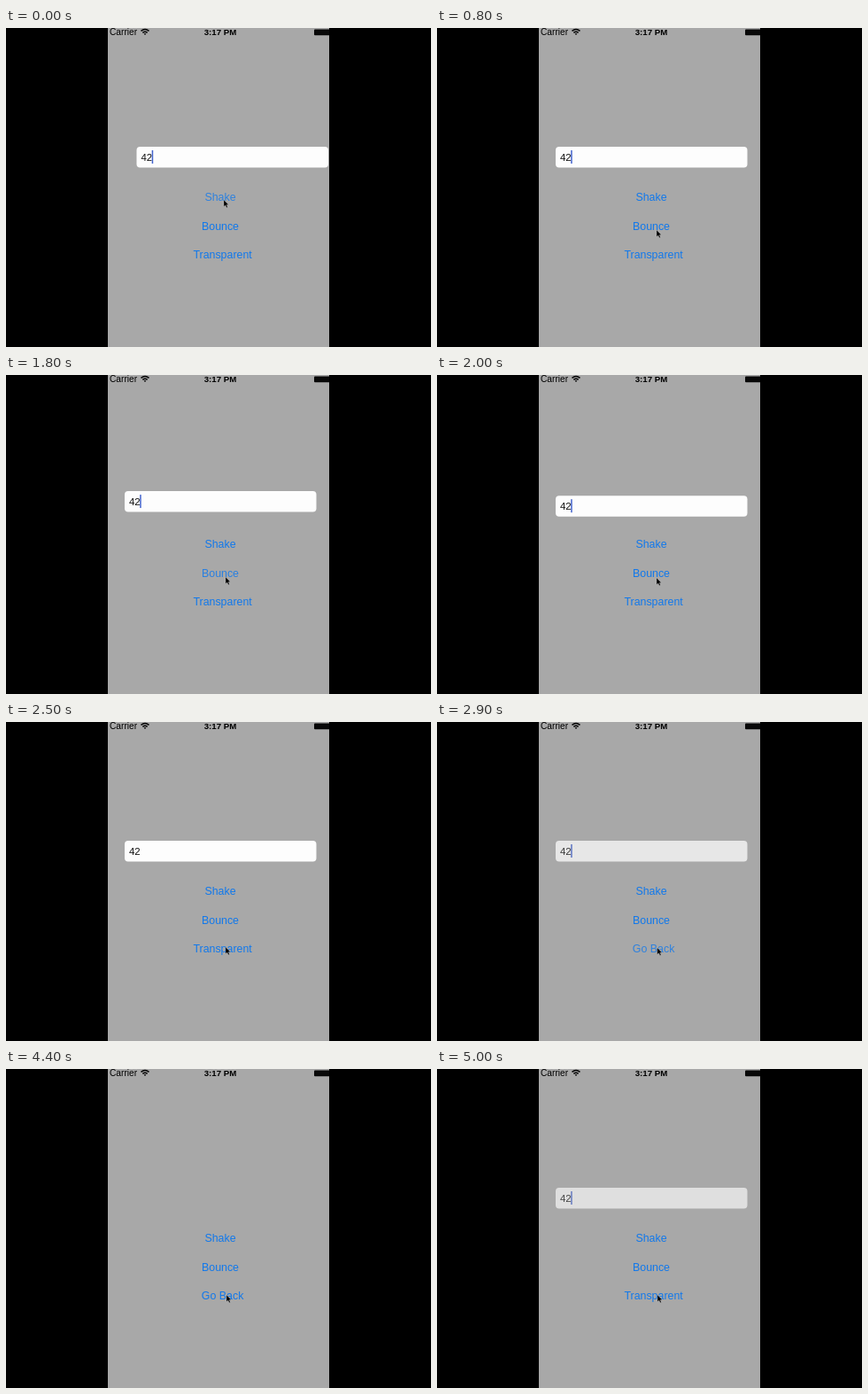
An HTML page for the animation above (5.1 s loop, 480x360 px).

```html
<!DOCTYPE html>
<html lang="en">
<head>
<meta charset="utf-8">
<title>Text field animations</title>
<style>
  html, body { margin: 0; width: 100%; height: 100%; overflow: hidden; background: #000; }
  svg { display: block; width: 480px; height: 360px; }
  text { font-family: "Liberation Sans", Arial, sans-serif; }
  .button { font-size: 12.4px; fill: #1078ec; text-anchor: middle; }
</style>
</head>
<body>
<svg viewBox="0 0 480 360">
  <clipPath id="screen"><rect x="115" width="250" height="360"/></clipPath>
  <g clip-path="url(#screen)">
    <rect x="115" width="250" height="360" fill="#a8a8a8"/>

    <text x="117" y="8.3" font-size="10.2">Carrier</text>
    <g fill="none" stroke="#000" stroke-width="1.5">
      <path d="M152.5 3.4Q157 -.4 161.5 3.4M154.4 5.3Q157 3.2 159.6 5.3"/>
      <path d="M155.7 6.4L157 8L158.3 6.4Q157 5.5 155.7 6.4Z" fill="#000" stroke="none"/>
    </g>
    <text x="242" y="8.3" font-size="9.7" font-weight="bold" text-anchor="middle">3:17 PM</text>
    <rect x="348" y="1.6" width="20" height="6.6" rx="1" fill="#080808"/>

    <g id="field">
      <rect x="134" y="134" width="216.5" height="23.5" rx="4" fill="#fdfdfd"/>
      <text x="139" y="150" font-size="11.4" fill="#111">42</text>
      <rect id="caret" x="151.2" y="138" width="1.5" height="15" fill="#4263cc"/>
    </g>

    <text class="button" id="shake" x="242" y="195.2">Shake</text>
    <text class="button" id="bounce" x="242" y="227.7">Bounce</text>
    <text class="button" id="toggle" x="244.6" y="260.2">Transparent</text>

    <path id="cursor" d="M0 0V7.6L1.8 6L3.1 8.8L4.3 8.2L3.1 5.5H5.3Z" fill="#000" stroke="#ddd" stroke-opacity=".45" stroke-width=".5"/>
  </g>
</svg>
<script>
  const LOOP = 5100, STEP = 100;
  const SHAKE = -300, BOUNCE = 1400, HIDE = 2600, SHOW = 4450;
  const $ = id => document.getElementById(id);
  const clamp = v => Math.min(1, Math.max(0, v));
  const ease = v => v * v * (3 - 2 * v);
  const ramp = (t, start, length) => ease(clamp((t - start) / length));

  // Damped spring, at rest before its start and once it has settled
  const spring = (t, start, size, decay, speed, end) => {
    const d = t - start;
    return d < 0 || d > end ? 0 : size * Math.exp(-d / decay) * Math.cos(d * speed);
  };

  // Title opacity: dims on touch, recovers after release
  const touch = (t, down, up) => t < down ? 1 : 0.2 + 0.8 * clamp((t - up) / 200);

  function draw(t) {
    const x = spring(t, 0, 13.5, 250, Math.PI / 100, 650);
    const y = spring(t, 1700, -12, 180, 0.0113, 750);
    $('field').setAttribute('transform', `translate(${x} ${y})`);
    $('field').setAttribute('opacity', 1 - ramp(t, 2700, 600) + ramp(t, 4600, 660));
    $('caret').setAttribute('opacity', clamp((Math.abs(t % 1000 - 480) - 150) / 100));

    $('shake').setAttribute('opacity', touch(t, SHAKE, -150));
    $('bounce').setAttribute('opacity', touch(t, BOUNCE, 1640));
    $('toggle').setAttribute('opacity', t < SHOW ? touch(t, HIDE, 2750) : touch(t, SHOW, 4600));
    $('toggle').textContent = t >= 2800 && t < 4600 ? 'Go Back' : 'Transparent';

    const toBounce = ramp(t, 300, 400), toToggle = ramp(t, 1950, 450), nudge = ramp(t, 2700, 300);
    const cx = 246 + 2 * toBounce + nudge;
    const cy = 194 + 34 * toBounce + 26 * toToggle + nudge;
    $('cursor').setAttribute('transform', `translate(${cx} ${cy})`);
  }

  const begin = performance.now();
  function tick() {
    const t = (performance.now() - begin) % LOOP;
    draw(Math.floor(t / STEP) * STEP);
    requestAnimationFrame(tick);
  }
  tick();
</script>
</body>
</html>
```
